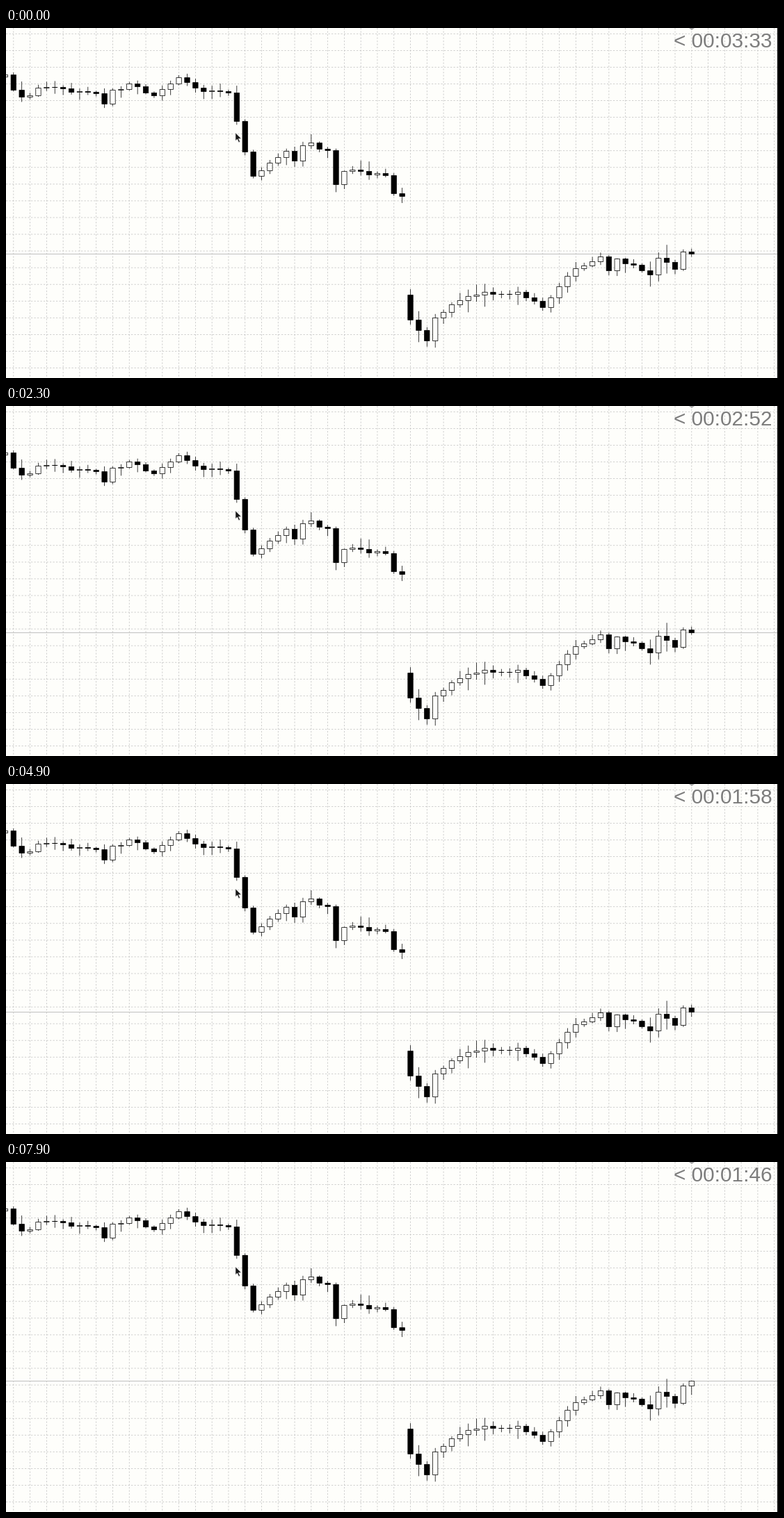
Recreate the animation shown at these times as a matplotlib script. Size 1110x504 px, loop 8000 ms.

```python
import numpy as np
import matplotlib.pyplot as plt
from matplotlib.animation import FuncAnimation
from matplotlib.patches import Polygon, Rectangle

W, H, DPI = 1110, 504, 100
STEP, FRAMES = 100, 80
PX = 72 / DPI
THIN = 0.75 * PX
BG, GRID, GREY = "#fefefb", "#c0c0c0", "#7d7d7d"

# Turning points of the closing price: (candle, y). A gap parts the two legs.
FALL = [(-1, 67), (0, 89), (1, 99), (3, 86), (10, 94), (11, 109), (12, 89),
        (14, 80), (17, 97), (20, 71), (22, 86), (26, 93), (28, 178),
        (29, 213), (33, 177), (34, 191), (35, 169), (38, 176), (39, 225),
        (40, 206), (45, 212), (46, 238), (47, 242)]
RISE = [(48, 420), (50, 450), (51, 417), (54, 392), (57, 380), (61, 380),
        (64, 402), (68, 346), (71, 329), (72, 349), (73, 332), (77, 355),
        (78, 331), (80, 347), (81, 322)]
LIVE, LIVE_OPEN, LIVE_HIGH, LIVE_LOW = 82, 322, 318, 328

# Turning points of the quote: (tenths of a second, y).
QUOTE = [(0, 325), (9, 323), (19, 324), (24, 327), (27, 327), (28, 330),
         (32, 330), (34, 334), (41, 330), (44, 328), (57, 328), (65, 324),
         (70, 320), (75, 320), (79, 315)]

# Countdown cuts: (first frame, seconds left, frames per second of countdown).
CUTS = [(0, 213, 2.25), (10, 178, 1.9), (44, 120, 2.5)]

quotes = np.round(np.interp(np.arange(FRAMES), *zip(*QUOTE)))
peaks = np.minimum.accumulate(np.minimum(quotes, LIVE_HIGH))
dips = np.maximum.accumulate(np.maximum(quotes, LIVE_LOW))
rng = np.random.default_rng(4)


def column(i):
    return 10.8 + 11.89 * i


def seconds_left(n):
    start, first, pace = max(cut for cut in CUTS if cut[0] <= n)
    return first - int((n - start) / pace + 1e-6)


class Candle:
    def __init__(self, ax, i):
        self.x = column(i)
        self.wick, = ax.plot([], [], color="black", lw=THIN, zorder=4, snap=False)
        self.body = Rectangle((self.x - 3.7, 0), 7.4, 1, ec="black", lw=THIN,
                              zorder=5, snap=False)
        ax.add_patch(self.body)

    def set(self, start, end, high, low):
        self.wick.set_data([self.x, self.x], [high, low + 1])
        self.body.set(y=min(start, end) + 0.5, height=max(abs(end - start), 0.01),
                      facecolor=BG if end < start else "black")


def draw_leg(ax, keys, start, wick):
    """Candles along the turning points, with small random swings between."""
    marks, levels = zip(*keys)
    for i in range(marks[0], marks[-1] + 1):
        end = round(np.interp(i, marks, levels))
        swing, up, down = rng.normal(0, 2), *rng.gamma(2, wick / 2, 2)
        if i not in marks:
            end += round(swing)
        Candle(ax, i).set(start, end, min(start, end) - min(up, 3 * wick),
                          max(start, end) + min(down, 2 * wick))
        start = end


fig = plt.figure(figsize=(W / DPI, H / DPI), dpi=DPI, facecolor=BG)
ax = fig.add_axes([0, 0, 1, 1])
ax.set(xlim=(0, W), ylim=(H, 0))
ax.axis("off")

dashed = dict(color=GRID, lw=THIN, ls=(0, (3, 3)), dash_capstyle="butt",
              snap=False, zorder=1)
for x in column(np.arange(0, 94, 2)):
    ax.plot([x, x], [0, H], **dashed)
for y in 8.3 + 24.06 * np.arange(21):
    ax.plot([0, W], [y, y], **dashed)

ax.add_patch(Polygon([(982, 0), (990, 0), (986, 3)], fc="#a8a8a8", lw=0, zorder=2))
ax.add_patch(Rectangle((1109, 0), 1, H, fc="black", lw=0, zorder=7))

draw_leg(ax, FALL, start=70, wick=5)
draw_leg(ax, RISE, start=384, wick=8)
live = Candle(ax, LIVE)

ax.add_patch(Polygon(
    [(330, 151), (330, 162.3), (332.6, 160), (334.6, 164.6), (336.4, 163.8),
     (334.4, 159.4), (338, 159.1)], fc="#181818", ec="#d8d8d8", lw=0.4, zorder=8))

quote, = ax.plot([], [], color=GRID, lw=PX, zorder=3, snap=False)
clock = ax.text(1101.7, 28, "", ha="right", va="baseline", color=GREY,
                family="Liberation Sans", size=29.7 * PX, zorder=9)


def draw(n):
    quote.set_data([0, W - 1], [quotes[n] + 0.5] * 2)
    live.set(LIVE_OPEN, quotes[n], peaks[n], dips[n])
    minutes, seconds = divmod(seconds_left(n), 60)
    clock.set_text(f"< 00:{minutes:02d}:{seconds:02d}")
    return quote, live.wick, live.body, clock


anim = FuncAnimation(fig, draw, frames=FRAMES, interval=STEP, repeat=True,
                     repeat_delay=0, blit=False)
plt.show()
```
